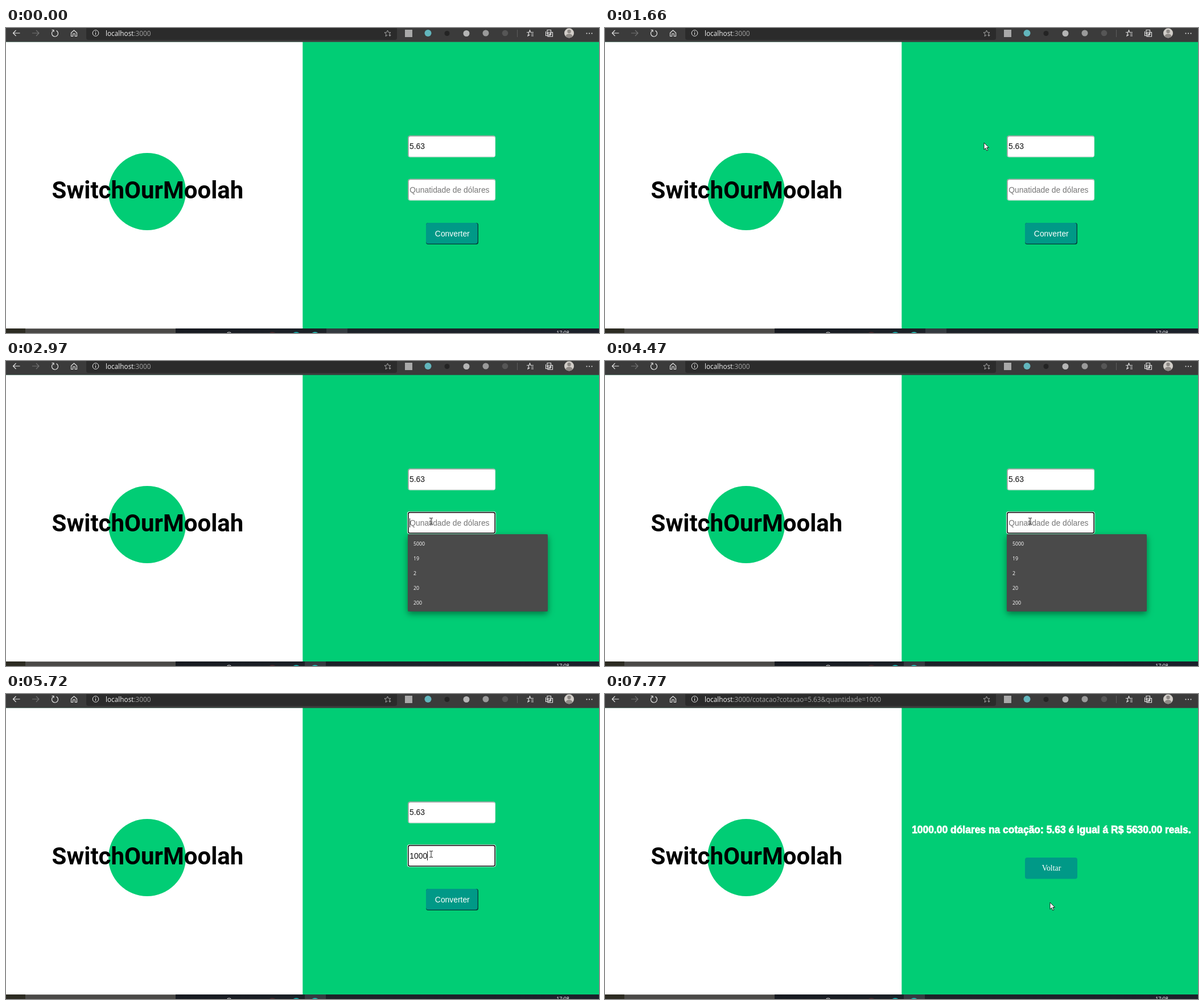
An HTML page with a canvas that plays this animation: 1042 px wide and 537 px high, repeating every 8 s.

```html
<!DOCTYPE html>
<html lang="pt">
<head>
<meta charset="utf-8">
<title>Conversor</title>
<style>
html, body { margin: 0; width: 100%; height: 100%; overflow: hidden; background: #fff; }
canvas { display: block; }
</style>
</head>
<body>
<canvas id="stage" width="1042" height="537"></canvas>
<script>
const c = document.getElementById('stage').getContext('2d');
const LOOP = 8000;
const SPLIT = 521.3, BAR = 529;
const GREEN = '#01cd75', TEAL = '#009987';
const SANS = '"Liberation Sans", Arial, sans-serif';
const UI = '"Open Sans", "Noto Sans", sans-serif';
const SERIF = '"Liberation Serif", Times, serif';

function rect(x, y, w, h, fill, r = 0) {
  c.fillStyle = fill;
  c.beginPath();
  c.roundRect(x, y, w, h, r);
  c.fill();
}

function disc(x, y, r, fill) {
  c.fillStyle = fill;
  c.beginPath();
  c.arc(x, y, r, 0, Math.PI * 2);
  c.fill();
}

function ring(x, y, r, color, w = 1, from = 0, to = Math.PI * 2) {
  c.strokeStyle = color;
  c.lineWidth = w;
  c.beginPath();
  c.arc(x, y, r, from, to);
  c.stroke();
}

// Strokes an SVG path shifted to x, y
function line(d, x, y, color, w = 1.1) {
  c.save();
  c.translate(x, y);
  c.strokeStyle = color;
  c.lineWidth = w;
  c.stroke(new Path2D(d));
  c.restore();
}

function text(s, x, y, font, fill, align = 'left') {
  c.font = font;
  c.fillStyle = fill;
  c.textAlign = align;
  c.fillText(s, x, y);
}

function toolbar(t) {
  const ink = '#e8e8e8', dim = '#757575';
  rect(0, 0, 1042, 24.5, '#3b3b3b');
  rect(141, -6, 546, 27, '#2b2b2b', 4);

  line('M6 0H-6M-1 -5L-6 0L-1 5', 18.5, 9, ink);
  line('M-6 0H6M1 -5L6 0L1 5', 52, 9, dim);
  if (t >= 7610 && t < 7770) {
    line('M-5 -5L5 5M5 -5L-5 5', 86, 9, ink);
  } else {
    ring(86, 9.5, 5.5, ink, 1.2, -1.1, 4.3);
    line('M-4.5 -6H-1V-2.5', 85, 9.5, ink);
  }
  line('M-5 -0.5L0 -5L5 -0.5V5.5H1.8V1H-1.8V5.5H-5Z', 119.5, 9, ink);
  ring(157.5, 9, 5.3, ink);
  line('M0 -1V3M0 -3.2V-2', 157.5, 9, ink);

  const url = '11.8px ' + UI;
  text('localhost', 175, 14, url, '#f4f4f4');
  const host = c.measureText('localhost').width;
  const rest = t < 7690 ? '' : '/cotacao?cotacao=5.63&quantidade=1000';
  text(':3000' + rest, 175 + host, 14, url, '#a2a2a2');

  const star = 'M0 -5.5L1.6 -1.8L5.5 -1.5L2.5 1.1M0 2.9L-3.5 5L-2.5 1.1L-5.5 -1.5L-1.6 -1.8L0 -5.5';
  line(star, 670.5, 9.5, '#b5b5b5', 0.9);
  line('M0 2.8H4M2 0.8V4.8', 672.5, 10, '#b5b5b5', 0.9);

  // Extension buttons
  rect(701, 3, 13, 13, '#a9a9a9');
  disc(741.5, 9, 6, '#62b6bd');
  disc(775, 9.5, 4.5, '#242424');
  disc(809, 9.5, 5.5, '#b5b5b5');
  disc(843, 9, 5.5, '#9a9a9a');
  disc(877, 9, 5.3, '#565656');
  rect(898, 3, 1, 13, '#5c5c5c');

  line('M-6 -1.8H-2L-0.5 -5.5L1 -1.8H6M-2 -1.8L-4 4.5L-0.5 2.2M2 1.2H6M2 4.2H6', 921, 9.5, ink);
  line('M-3 -5.5H3.5V1.5H-3ZM-5.5 -3V4.5H2', 954, 9, ink);
  line('M-2.5 -1.5H6V6H-2.5ZM1.8 0V4.5M-0.5 2.2H4', 954.5, 9, ink);
  disc(989.5, 9, 8.5, '#d2cec9');
  disc(989.5, 6, 3.2, '#8e8a86');
  c.save();
  c.beginPath();
  c.arc(989.5, 9, 8.5, 0, Math.PI * 2);
  c.clip();
  c.beginPath();
  c.ellipse(989.5, 15, 6, 4.8, 0, 0, Math.PI * 2);
  c.fill();
  c.restore();
  for (let i = -1; i < 2; i++) disc(1025 + i * 4.5, 9.5, 1, ink);
}

function taskbar(t) {
  const bar = c.createLinearGradient(298, 0, 1042, 0);
  bar.addColorStop(0, '#171a20');
  bar.addColorStop(0.4, '#1d2229');
  bar.addColorStop(1, '#1c202b');
  rect(0, BAR, 1042, 8, bar);
  rect(0, BAR, 34, 8, '#2c2b22');
  rect(34, BAR, 264, 8, '#6c6b69');
  rect(34, BAR + 1, 264, 7, '#4a4947');
  rect(t < 2900 ? 563 : 525, BAR, 37, 8, '#353a40');
  ring(392, 539, 3.5, '#d8d8d8', 1.2);
  disc(468, 543, 8, '#46272b');
  disc(510, 543, 8, '#12a5a5');
  disc(543, 543, 8, '#20b5ad');
  text('17:08', 978.5, 540, '8.8px ' + UI, '#fff', 'center');
}

function brand() {
  rect(0, 24.5, SPLIT, BAR - 24.5, '#fff');
  disc(248, 288, 68, GREEN);
  text('SwitchOurMoolah', 249, 300, 'bold 42px Roboto, sans-serif', '#000', 'center');
}

function field(y, focus) {
  if (focus) {
    rect(705, y - 0.8, 155.8, 39.6, '#fff', 4);
    rect(706, y, 154, 38, '#101010', 3.5);
    rect(707.6, y + 1.6, 150.8, 34.8, '#fff', 2);
    return;
  }
  rect(706.3, y, 153.7, 38, '#e6e6e6', 4);
  rect(706.3, y, 152.7, 37, '#9c9c9c', 4);
  rect(707.8, y + 1.5, 151.2, 35.5, '#fff', 3);
}

function list(items) {
  const h = 6 + items.length * 26;
  c.save();
  c.shadowColor = 'rgba(0,0,0,.45)';
  c.shadowBlur = 12;
  c.shadowOffsetY = 4;
  rect(706, 305, 246, h, '#4a4a4a', 2);
  c.restore();
  items.forEach((s, i) => text(s, 716, 325 + i * 26.1, '8.8px ' + UI, '#fff'));
}

function caretOn(t) {
  const flips = [2900, 3360, 3930, 4470, 4790, 6260, 6730, 7290];
  return flips.filter(f => t >= f).length % 2 === 1;
}

function form(t) {
  const font = '13.87px ' + SANS;
  const typed = '1000'.slice(0, [4790, 5170, 5330, 5720].filter(k => t >= k).length);
  field(189.6, false);
  text('5.63', 709, 213, font, '#111');
  field(265.8, t >= 2900);
  text(typed || 'Qunatidade de dólares', 709.3, 290, font, typed ? '#111' : '#767676');
  if (caretOn(t)) {
    const x = typed ? 709.3 + c.measureText(typed).width : 709;
    rect(Math.round(x), 277, 1, 16, '#111');
  }

  rect(738, 343, 92, 38, '#063b36', 4);
  rect(738, 343, 90.7, 36.7, TEAL, 4);
  text('Converter', 784.3, 366.5, font, '#fff', 'center');

  if (t >= 2900 && t < 4790) list(['5000', '19', '2', '20', '200']);
  else if (t >= 4790 && t < 5170) list(['19']);
}

function result() {
  const msg = '1000.00 dólares na cotação: 5.63 é igual á R$ 5630.00 reais.';
  text(msg, 784.4, 245, 'bold 17.46px ' + SANS, '#fff', 'center');
  c.strokeStyle = '#fff';
  c.lineWidth = 0.8;
  c.strokeText(msg, 784.4, 245);
  rect(738, 288, 92, 37.5, TEAL, 4);
  text('Voltar', 784.5, 311, '13.87px ' + SERIF, '#fff', 'center');
}

// Pointer legs: start, end, number of steps, points along the way
const legs = [
  [440, 510, 2, [[1032, 530], [1016, 529]]],
  [840, 1570, 10, [[1000, 518], [720, 390], [640, 262], [656, 207]]],
  [1660, 2460, 11, [[666, 202], [658, 194], [710, 200], [779, 215], [766, 248], [747, 276]]],
  [2510, 2510, 1, [[747, 282]]],
  [6730, 7050, 5, [[748, 286], [762, 325], [778, 373]]],
  [7290, 7290, 1, [[782, 367]]]
];

function pointer(t) {
  const leg = legs.filter(l => t >= l[0]).pop();
  if (!leg) return null;
  const [t0, t1, n, pts] = leg;
  if (n === 1) return pts[0];
  const k = Math.min(n - 1, Math.floor((t - t0) / (t1 - t0) * (n - 1)));
  const p = k / (n - 1) * (pts.length - 1);
  const i = Math.min(pts.length - 2, Math.floor(p));
  return pts[i].map((v, j) => v + (pts[i + 1][j] - v) * (p - i));
}

function cursor(t) {
  const at = pointer(t);
  if (!at) return;
  const [x, y] = at.map(Math.round);
  if (t >= 2830 && t < 2970 || t >= 7290 && t < 7440) disc(x - 0.5, y, 9.5, 'rgba(250,230,0,.7)');
  const overField = t < 7690 && x > 706 && x < 860 && (y > 190 && y < 228 || y > 266 && y < 304);
  if (overField) {
    line('M-3 -5.5H-1L0 -4.8L1 -5.5H3M0 -5V5M-3 5.5H-1L0 4.8L1 5.5H3', x, y, '#222', 1);
    return;
  }
  c.save();
  c.translate(x, y);
  const arrow = new Path2D('M0 0V12L2.8 9.4L4.8 14L6.8 13.1L4.8 8.6H8.5Z');
  c.fillStyle = '#fff';
  c.fill(arrow);
  c.strokeStyle = '#111';
  c.lineWidth = 0.9;
  c.stroke(arrow);
  c.restore();
}

function draw(t) {
  rect(0, 24.5, 1042, BAR - 24.5, GREEN);
  brand();
  if (t < 7690) form(t);
  else result();
  toolbar(t);
  taskbar(t);
  cursor(t);
}

const start = performance.now();
function tick() {
  draw((performance.now() - start) % LOOP);
  requestAnimationFrame(tick);
}
tick();
</script>
</body>
</html>
```
